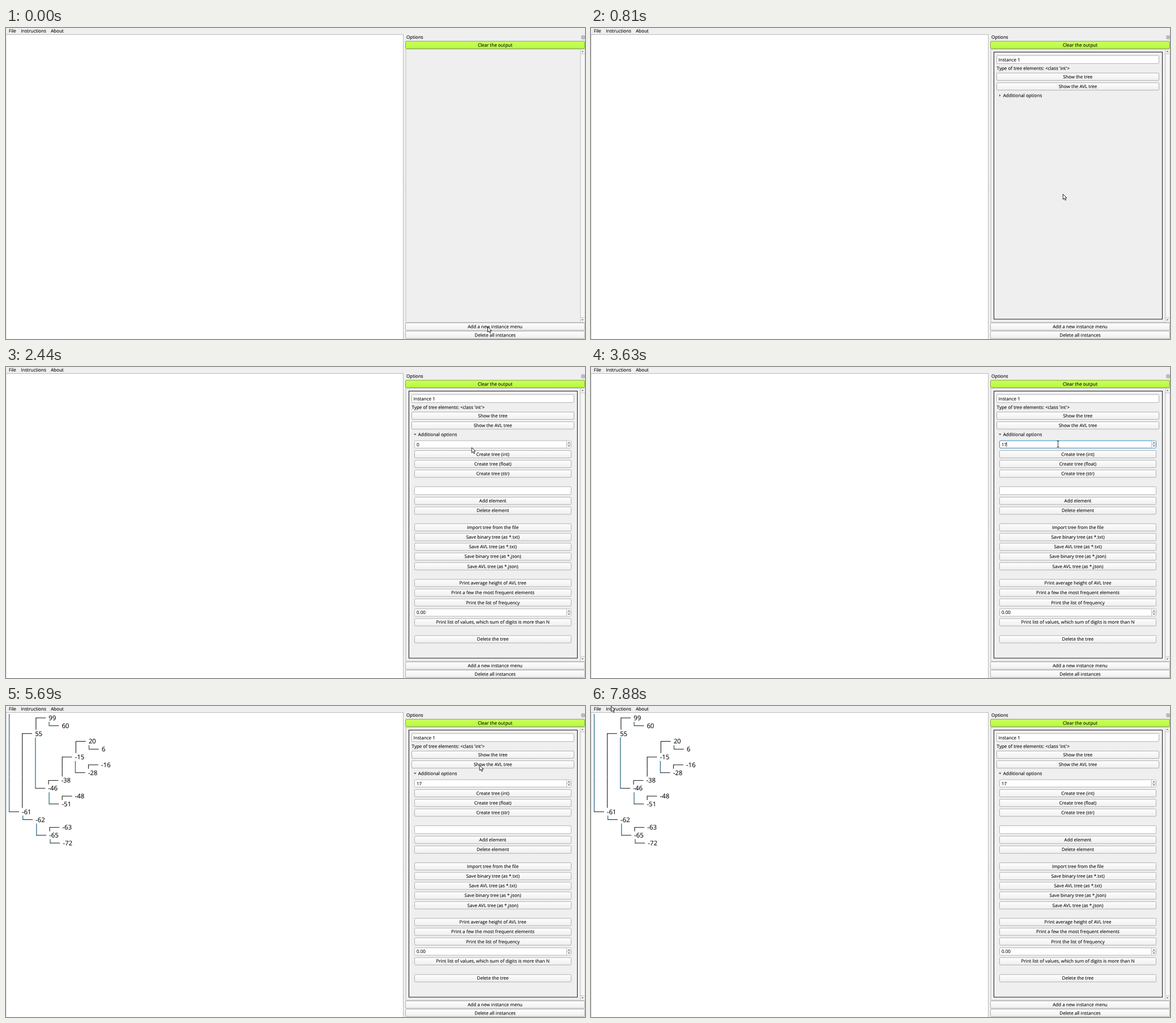
These frames come from a looping animation (1021 px wide and 549 px high, 7.95 s). An HTML page:

```html
<!DOCTYPE html>
<html lang="en">
<head>
<meta charset="utf-8">
<title>Binary tree viewer</title>
<style>
  html, body { margin: 0; width: 100%; height: 100%; overflow: hidden; background: #efefef; }
  svg { display: block; width: 1021px; height: 549px; }
  text {
    font: 8.05px "Open Sans", "Noto Sans", sans-serif;
    fill: #0c0c0c; stroke: #0c0c0c; stroke-width: .12px;
    text-rendering: geometricPrecision; white-space: pre;
  }
  .mid { text-anchor: middle; }
  .tree text { font-size: 11.3px; }
  .button { fill: url(#grey); stroke: #b1b1b1; }
  .button.green { fill: url(#green); stroke: #86a843; }
  .button.down { fill: #d9d9d9; }
  .field { fill: #fff; stroke: #b6b6b6; }
  .field.focus { stroke: #308cc6; }
  .line { stroke: #c2c2c2; fill: none; }
  .mark { fill: #555; }
</style>
</head>
<body>
<svg id="stage" viewBox="0 0 1021 549">
  <defs>
    <linearGradient id="grey" x2="0" y2="1">
      <stop stop-color="#fefefe"/><stop offset="1" stop-color="#efeff0"/>
    </linearGradient>
    <linearGradient id="green" x2="0" y2="1">
      <stop stop-color="#c9ff5c"/><stop offset="1" stop-color="#b7fb3c"/>
    </linearGradient>
  </defs>
</svg>
<script>
const LOOP = 7950;
const stage = document.getElementById('stage');

function add(parent, tag, attrs, content) {
  const el = document.createElementNS('http://www.w3.org/2000/svg', tag);
  for (const key in attrs) el.setAttribute(key, attrs[key]);
  if (content !== undefined) el.textContent = content;
  parent.appendChild(el);
  return el;
}
const group = (parent, cls = '') => add(parent, 'g', { class: cls });
const path = (parent, d, attrs) => add(parent, 'path', { d, ...attrs });
const label = (parent, x, cy, str, cls = '') =>
  add(parent, 'text', { x, y: cy + 2.8, class: cls }, str);
const box = (parent, x, y, width, height, attrs) =>
  add(parent, 'rect', { x, y, width, height, ...attrs });

function button(parent, x1, x2, cy, str, cls = '') {
  const face = box(parent, x1, cy - 6.5, x2 - x1, 13, { rx: 1.5, class: 'button ' + cls });
  label(parent, (x1 + x2) / 2, cy, str, 'mid');
  return face;
}
const field = (parent, x1, x2, cy, h = 13) =>
  box(parent, x1, cy - h / 2, x2 - x1, h, { rx: 1.5, class: 'field' });
const arrow = (parent, x, y, s) =>
  path(parent, `M${x - 2} ${y + s}h4l-2 ${-2 * s}z`, { class: 'mark' });

function spin(parent, cy, str) {
  const frame = field(parent, 720.5, 996.5, cy);
  box(parent, 989, cy - 6, 7, 12, { fill: '#f5f5f5' });
  path(parent, `M988.5 ${cy - 6}v12M989 ${cy}h7`, { class: 'line' });
  arrow(parent, 992.7, cy - 3, 1);
  arrow(parent, 992.7, cy + 3, -1);
  return { frame, value: label(parent, 724, cy + .2, str) };
}

// Window chrome
box(stage, 0, 0, 1021, 549, { fill: '#efefef' });
box(stage, 0, 11.5, 700.5, 540, { fill: '#fff', stroke: '#bababa' });
[['File', 5], ['Instructions', 26.3], ['About', 79]].forEach(([s, x]) => label(stage, x, 5, s));
for (let y = 274; y < 290; y += 3) box(stage, 702, y, 1, 1, { fill: '#d6d6d6' });
label(stage, 706, 16.6, 'Options');
box(stage, 1015, 13.7, 5.4, 5.4, { rx: 1, fill: 'none', stroke: '#707070', 'stroke-width': .8 });
path(stage, 'M1016.3 15l2.8 2.8M1019.1 15l-2.8 2.8', { stroke: '#606060', 'stroke-width': .8 });
button(stage, 704.5, 1020.5, 29.8, 'Clear the output', 'green');
box(stage, 705, 37.5, 315.5, 482, { class: 'line' });
box(stage, 1013, 38, 7.5, 481, { fill: '#f7f7f7' });
path(stage, 'M1013 38v481M1013 45.5h7.5M1013 511.5h7.5', { class: 'line' });
arrow(stage, 1016.6, 41.2, 1);
arrow(stage, 1016.6, 515.5, -1);
const addButton = button(stage, 704.5, 1020.5, 527.2, 'Add a new instance menu');
button(stage, 704.5, 1020.5, 541.7, 'Delete all instances');

// Instance panel
const panel = group(stage);
box(panel, 710.5, 42.5, 297, 471.5, { fill: 'none', stroke: '#1a1a1a' });
field(panel, 715.5, 1001.5, 55.7, 14);
label(panel, 718.5, 55.9, 'Instance 1');
label(panel, 715.6, 71.3, "Type of tree elements: <class 'int'>");
button(panel, 715.5, 1001.5, 86, 'Show the tree');
button(panel, 715.5, 1001.5, 103.2, 'Show the AVL tree');
label(panel, 726.7, 119.2, 'Additional options');
const folded = path(panel, 'M720 116.8v4.4l2.4-2.2z', { class: 'mark' });

const options = group(panel);
path(options, 'M719 117.8h4.6l-2.3 2.6z', { class: 'mark' });
const count = spin(options, 136.6, '0');
const caret = path(options, 'M0 132.5v8.5', { stroke: '#111', 'stroke-width': .7 });
field(options, 720.5, 996.5, 218.3, 14);
spin(options, 433.4, '0.00');
const blocks = [
  [154, 'Create tree (int)', 'Create tree (float)', 'Create tree (str)'],
  [236.4, 'Add element', 'Delete element'],
  [283.2, 'Import tree from the file', 'Save binary tree (as *.txt)', 'Save AVL tree (as *.txt)',
    'Save binary tree (as *.json)', 'Save AVL tree (as *.json)'],
  [381.4, 'Print average height of AVL tree', 'Print a few the most frequent elements',
    'Print the list of frequency'],
  [450.6, 'Print list of values, which sum of digits is more than N'],
  [480.5, 'Delete the tree'],
];
for (const [top, ...names] of blocks)
  names.forEach((name, i) => button(options, 720.5, 996.5, top + i * 17.15, name));

// Rows read "depth corner value"; r opens downwards to its parent, L upwards.
function drawTree(spec) {
  const g = group(stage, 'tree');
  const rows = spec.split(' ').map(s => {
    const [, depth, corner, value] = s.match(/(\d)([rL])(.+)/);
    return { depth: +depth, up: corner === 'L', value, bars: {} };
  });
  rows.forEach((row, i) => {
    const step = row.up ? -1 : 1;
    for (let j = i + step; rows[j] && rows[j].depth !== row.depth - 1; j += step)
      rows[j].bars[row.depth] = row.up;
  });
  const upright = (x, y1, y2, up) => path(g, `M${x} ${y1}V${y2}`,
    { stroke: up ? '#1d5f80' : '#2c2827', 'stroke-width': 1.2 });
  rows.forEach((row, i) => {
    const y = 21 + i * 13.81, top = y - 6.95, bottom = y + 6.95;
    let x = 5.6;
    for (let c = 0; c < row.depth; c++) {
      const barred = c in row.bars;
      if (barred) upright(x, top, bottom, row.bars[c]);
      x += barred ? 23.15 : 24.1;
    }
    upright(x, row.up ? top : y - .5, row.up ? y + .5 : bottom, row.up);
    path(g, `M${x} ${y}h17.3`, { stroke: '#262626', 'stroke-width': 1.1 });
    add(g, 'text', { x: x + 22.4, y: y + 4 }, row.value);
  });
  return g;
}
const plain = drawTree('2r99 3L60 1r55 5r20 6L6 4r-15 6r-16 5L-28 3r-38 2L-46 4r-48 3L-51 0L-61 1L-62 3r-63 2L-65 3L-72');
const avl = drawTree('2r99 3L60 1r55 3r20 4L6 2L-15 3L-16 0L-28 3r-38 2r-46 4r-48 3L-51 1L-61 3r-62 4L-63 2L-65 3L-72');

// Pointers
const pointer = path(stage, 'M0 0V9.4L2.2 7.4 3.8 10.9 5.4 10.2 3.9 6.9H6.7Z',
  { fill: '#fff', stroke: '#111', 'stroke-width': .9, 'stroke-linejoin': 'round' });
const beam = path(stage, 'M821.5 130.7h4M821.5 141.3h4M823.5 130.7v10.6',
  { stroke: '#222', 'stroke-width': .9 });

// [time, x, y], each held until the next
const moves = [
  [0, 849.5, 527.5],
  [690, 846, 470], [750, 839, 380], [810, 832.3, 293.2], [870, 825, 225], [940, 817, 176],
  [1000, 811, 150], [1060, 806, 136], [1130, 802, 128], [1190, 799, 123], [1250, 796.5, 120],
  [1310, 794.5, 118.6], [1380, 792.7, 117.8], [1440, 791.5, 117.4], [1500, 788.5, 117.2],
  [1560, 785.8, 117.4], [2440, 821.2, 142], [4130, 835.8, 153], [4940, 835.3, 116],
  [5310, 835.2, 105.2], [5690, 835.2, 104.5], [6880, 841.6, 87], [7880, 35.6, .4],
];

const show = (el, on) => el.setAttribute('visibility', on ? 'inherit' : 'hidden');

function render(t) {
  const within = (a, b = LOOP) => t >= a && t < b;
  addButton.classList.toggle('down', within(440, 500));
  show(panel, within(500));
  show(folded, within(0, 2440));
  show(options, within(2440));
  count.value.textContent = within(3630) ? '17' : '0';
  count.frame.classList.toggle('focus', within(3190, 4500));
  show(caret, within(3190, 4130));
  caret.setAttribute('transform', `translate(${within(3630) ? 733 : 729})`);
  show(plain, within(4500, 6500) || within(7380));
  show(avl, within(6500, 7380));
  show(beam, within(2750, 4130));
  show(pointer, !within(2750, 4130));
  const [, x, y] = moves.filter(m => m[0] <= t).pop();
  pointer.setAttribute('transform', `translate(${x} ${y})`);
}

const start = performance.now();
function tick() {
  render((performance.now() - start) % LOOP);
  requestAnimationFrame(tick);
}
tick();
</script>
</body>
</html>
```
